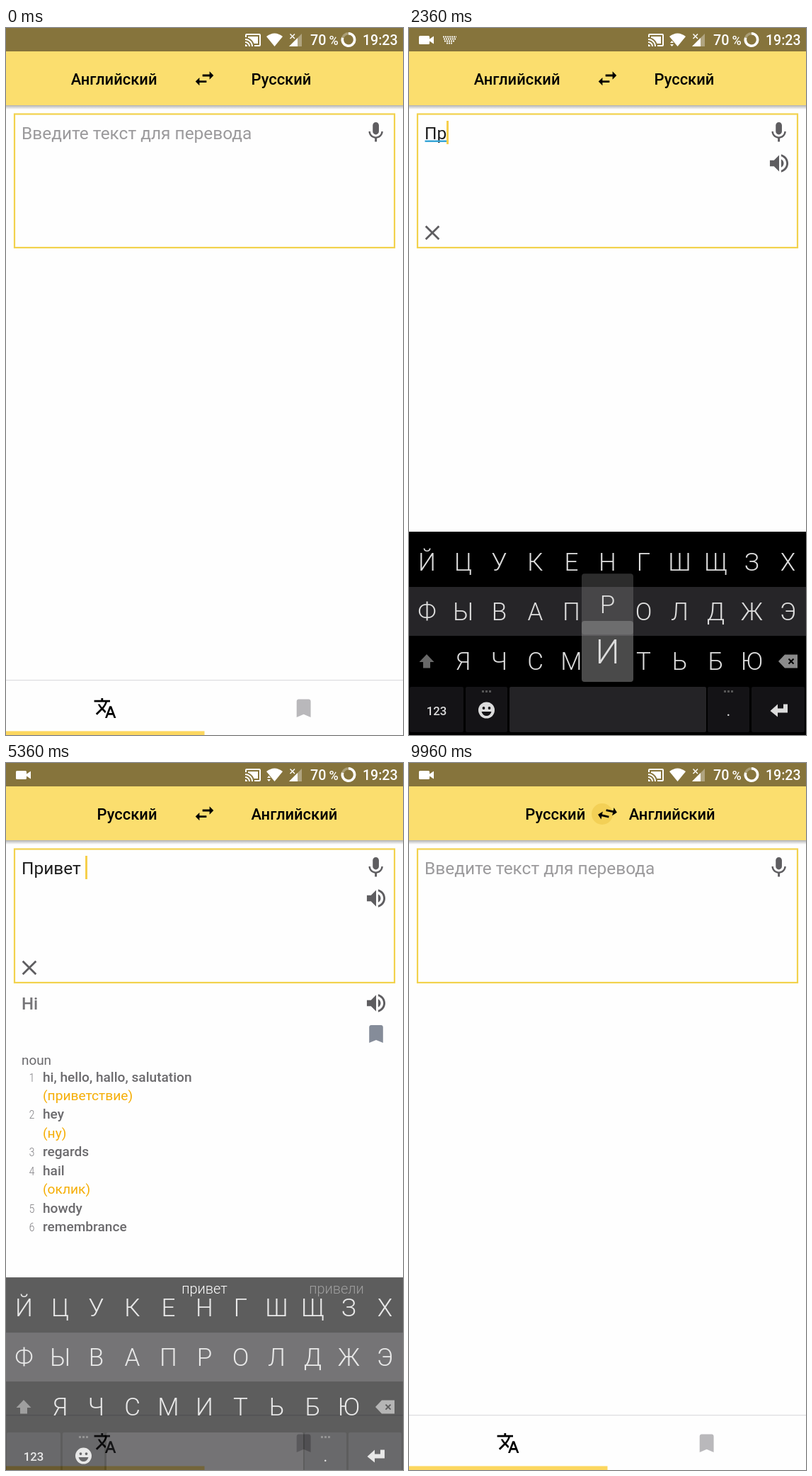
These frames come from a looping animation (561x998 px, 10000 ms). An HTML page:

```html
<!DOCTYPE html>
<html lang="ru">
<head>
<meta charset="utf-8">
<title>Переводчик</title>
<style>
html, body { margin: 0; width: 100%; height: 100%; overflow: hidden; background: #fefefe; }
svg { display: block; font-family: Roboto, "Noto Sans", sans-serif; }
.mid { text-anchor: middle; }
.lang { font-size: 21.9px; font-weight: 500; }
.field { font-size: 24.45px; }
.dict { font-size: 19.1px; font-weight: 500; fill: #6b6a6d; }
.note { font-size: 19.2px; fill: #f5ae06; }
.num { font: 300 16.5px "Roboto Condensed", Roboto, sans-serif; fill: #858488; }
.key { font-weight: 300; fill: #dcdcdc; text-anchor: middle; }
</style>
</head>
<body>
<svg id="stage" width="561" height="998" viewBox="0 0 561 998">
  <defs>
    <linearGradient id="shade" x2="0" y2="1">
      <stop stop-color="#000" stop-opacity=".3"/><stop offset="1" stop-color="#000" stop-opacity="0"/>
    </linearGradient>
    <path id="mic" d="M12 14c1.66 0 2.99-1.34 2.99-3L15 5c0-1.66-1.34-3-3-3S9 3.34 9 5v6c0 1.66 1.34 3 3 3zm5.3-3c0 3-2.54 5.1-5.3 5.1S6.7 14 6.7 11H5c0 3.41 2.72 6.23 6 6.72V21h2v-3.28c3.28-.48 6-3.3 6-6.72h-1.7z"/>
    <path id="sound" d="M3 9v6h4l5 5V4L7 9H3zm13.5 3c0-1.77-1.02-3.29-2.5-4.03v8.05c1.48-.73 2.5-2.25 2.5-4.02zM14 3.23v2.06c2.89.86 5 3.54 5 6.71s-2.11 5.85-5 6.71v2.06c4.01-.91 7-4.49 7-8.77s-2.99-7.86-7-8.77z"/>
    <path id="mark" d="M17 3H7c-1.1 0-1.99.9-1.99 2L5 21l7-3 7 3V5c0-1.1-.9-2-2-2z"/>
  </defs>

  <rect width="561" height="998" fill="#fefefe"/>
  <rect y="109" width="561" height="6" fill="url(#shade)"/>
  <rect y="33" width="561" height="76" fill="#fbde6e"/>
  <rect width="561" height="33" fill="#86743c"/>

  <g fill="#fff">
    <path id="camera" d="M15.5 11H27.5Q29 11 29 12.5V15.5L35 11.5V22.5L29 18.500V21.5Q29 23 27.5 23H15.5Q14 23 14 21.5V12.5Q14 11 15.5 11Z"/>
    <path id="kbIcon" d="M48 12.500H67M49 15.500H66M50 18.500H65M53 21.500H62" fill="none" stroke="#fff" stroke-width="2" stroke-dasharray="2 1"/>
    <path transform="translate(337 5)" d="M21 3H3c-1.1 0-2 .9-2 2v3h2V5h18v14h-7v2h7c1.1 0 2-.9 2-2V5c0-1.1-.9-2-2-2zM1 18v3h3c0-1.66-1.34-3-3-3zm0-4v2c2.76 0 5 2.24 5 5h2c0-3.87-3.13-7-7-7zm0-4v2c4.97 0 9 4.03 9 9h2c0-6.08-4.93-11-11-11zM19 7H5v1.63c3.96 1.28 7.09 4.41 8.37 8.37H19V7z"/>
    <path d="M368 12Q379.5 3 391 12L379.5 26Z"/>
    <path id="traffic" d="M369 21L371.5 18L374 21ZM369 23L371.5 26L374 23Z"/>
    <path d="M400 26L418 8V26Z" opacity=".35"/>
    <path d="M400 26L412 14V26Z"/>
    <path d="M401.5 8.5L408 15M408 8.5L401.5 15" stroke="#fff" stroke-width="1.5"/>
    <text x="430" y="24" font-size="19.7" font-weight="500">70</text>
    <text x="456.500" y="24" font-size="18" font-weight="500">%</text>
    <text x="504" y="24" font-size="19.5" font-weight="500">19:23</text>
    <g fill="none" stroke="#fff" stroke-width="3.5">
      <circle cx="484" cy="16.5" r="8.7" opacity=".3"/>
      <path d="M484 7.8A8.7 8.7 0 1 1 475.7 13.8"/>
    </g>
  </g>

  <circle id="ripple" cx="273" cy="72" fill="#f1ce52" opacity=".85"/>
  <text id="from" class="lang" y="79.5" text-anchor="end"></text>
  <text id="to" class="lang" y="79.5"></text>
  <path id="arrows" d="M6.99 11L3 15l3.99 4v-3H14v-2H6.99v-3zM21 9l-3.99-4v3H10v2h7.01v3L21 9z"/>

  <rect x="12" y="121.500" width="537" height="188.5" fill="none" stroke="#f2d24d" stroke-width="2.2"/>
  <text id="hint" class="field" x="22" y="157" fill="#9b9a9c">Введите текст для перевода</text>
  <text id="typed" class="field" x="22" y="157" fill="#1c1c1c"></text>
  <rect id="under" x="22.5" y="158.5" height="2.5" fill="#38a5d6"/>
  <rect id="caret" y="131" width="3" height="33" fill="#f6cf4c"/>
  <g fill="#5e5d60">
    <use href="#mic" transform="translate(505.2 130.1) scale(1.45)"/>
    <g id="tools">
      <use href="#sound" transform="translate(505.6 173.6) scale(1.45)"/>
      <path d="M23.7 279.7L42.3 298.3M42.3 279.7L23.7 298.3" stroke="#5e5d60" stroke-width="2.8"/>
    </g>
    <g id="answer">
      <text x="22" y="348" font-size="24" font-weight="500" fill="#757477">Hi</text>
      <use href="#sound" transform="translate(505.6 321.6) scale(1.45)"/>
      <use href="#mark" transform="translate(506.2 365.7) scale(1.4)" fill="#858c99"/>
    </g>
  </g>
  <g id="dict"></g>

  <rect y="920" width="561" height="1.3" fill="#dedde0"/>
  <rect y="992.5" width="280.5" height="5.5" fill="#fcd75f"/>
  <path transform="translate(123.2 943.2) scale(1.4)" d="M12.87 15.07l-2.54-2.51.03-.03c1.74-1.94 2.98-4.17 3.71-6.53H17V4h-7V2H8v2H1v1.99h11.17C11.5 7.92 10.44 9.75 9 11.35 8.07 10.32 7.3 9.19 6.69 8h-2c.73 1.63 1.73 3.17 2.98 4.56l-5.09 5.02L4 19l5-5 3.11 3.11.76-2.04zM18.5 10h-2L12 22h2l1.12-3h4.75L21 22h2l-4.5-12zm-2.62 7l1.62-4.33L19.12 17h-3.24z"/>
  <use href="#mark" transform="translate(403.6 943.3) scale(1.42)" fill="#b9b8bb"/>

  <g id="keyboard">
    <rect y="711" width="561" height="327"/>
    <rect y="789" width="561" height="69" fill="#262528"/>
    <g id="bottomKeys" fill="#141316"></g>
    <rect id="space" x="142" y="930" width="278" height="64" rx="2" fill="#242326"/>
    <g id="spaceName" fill="none" stroke="#bbb">
      <text class="mid" x="280.5" y="969.5" font-size="18.5" font-weight="300" fill="#bbb" stroke="none">Русский</text>
      <path d="M237 959V968L228 963.5ZM324 959V968L333 963.5Z"/>
    </g>
    <g id="letters" font-size="35"></g>
    <path id="shift" d="M25 884L35.5 895H30V903.5H20V895H14.5Z"/>
    <path d="M522 894L531 884.5H549V903.5H531Z" fill="#8b8b8b"/>
    <path d="M536.5 890.5L543.5 897.5M543.5 890.5L536.5 897.5" stroke="#000" stroke-width="2"/>
    <g fill="#dcdcdc">
      <text class="mid" x="39" y="969.5" font-size="16.8" font-weight="500">123</text>
      <circle cx="109.5" cy="963" r="11.5"/>
      <text class="mid" x="451.5" y="971" font-size="22">.</text>
      <path d="M510.5 964L521 954.5V960.5H529V954.5H535V966.5H521V972.5Z"/>
    </g>
    <path d="M103 936.5H116M445 936.5H458" stroke="#555" stroke-width="3" stroke-dasharray="3 2"/>
    <g fill="#141316">
      <circle cx="105.5" cy="960" r="1.9"/><circle cx="113.5" cy="960" r="1.9"/>
      <path d="M102.5 965H116.5Q114.5 971 109.5 971Q104.5 971 102.5 965Z"/>
    </g>
    <g id="suggest" font-size="20" font-weight="300" fill="#fff">
      <text class="mid" x="280.5" y="733.5">привет</text>
      <text class="mid" x="467" y="733.5" opacity=".4">привели</text>
    </g>
    <g id="popups"></g>
  </g>
</svg>
<script>
const $ = id => document.getElementById(id);
const set = (el, attrs) => { for (const k in attrs) el.setAttribute(k, attrs[k]); };
const show = (id, on) => $(id).setAttribute('opacity', +on);
const clamp = x => Math.max(0, Math.min(1, x));
const within = (t, spans) => spans.some(([a, b]) => t >= a && t < b);
const create = tag => document.createElementNS('http://www.w3.org/2000/svg', tag);

const entries = [
  ['hi, hello, hallo, salutation', '(приветствие)'], ['hey', '(ну)'], ['regards'],
  ['hail', '(оклик)'], ['howdy'], ['remembrance']
];
let y = 449.5, html = '<text x="22" y="425.5" font-size="18.9" fill="#6b6a6d">noun</text>';
entries.forEach(([word, note], i) => {
  html += `<text class="num" x="32.5" y="${y}">${i + 1}</text><text class="dict" x="52" y="${y}">${word}</text>`;
  y += 26.45;
  if (note) {
    html += `<text class="note" x="52" y="${y}">${note}</text>`;
    y += 26.45;
  }
});
$('dict').innerHTML = html;

$('bottomKeys').innerHTML = [[1, 76], [80, 59], [422, 59], [484, 75]]
  .map(([x, w]) => `<rect x="${x}" y="930" width="${w}" height="64" rx="2"/>`).join('');

const keys = {};
[['ЙЦУКЕНГШЩЗХ', 25.5, 753.5], ['ФЫВАПРОЛДЖЭ', 25.5, 823.5], ['ЯЧСМИТЬБЮ', 76.5, 893]].forEach(([row, x, cy]) =>
  [...row].forEach((ch, i) => {
    const el = create('text');
    keys[ch] = { cx: x + i * 51, cy, el };
    set(el, { class: 'key', x: keys[ch].cx, y: cy + 12.5 });
    el.textContent = ch;
    $('letters').append(el);
  }));

// letter, press time, release time
const presses = [
  ['П', 1900, 1980], ['р', 2200, 2280], ['и', 2340, 2420],
  ['в', 2560, 2640], ['е', 2800, 2890], ['т', 2930, 3010]
];
const pops = presses.map(([ch, down, up]) => {
  const key = keys[ch.toUpperCase()];
  const g = create('g');
  g.innerHTML = `<rect x="${key.cx - 36.5}" width="73" height="86" rx="4" fill="#949494"/>` +
    `<text class="key" x="${key.cx}">${ch.toUpperCase()}</text>`;
  $('popups').append(g);
  return { key, down, up, g };
});

const blinks = [
  [80, 400], [1320, 1600], [1840, 4000], [4240, 4520], [5000, 5520],
  [6000, 6280], [6800, 7280], [7800, 8280], [8800, 9160]
];
const CLEAR = 8800, SPACE = 3120, SWAPS = [3840, 9882], SWAP_MS = 500;

function drawKeyboard(t) {
  const enter = clamp((t - 960) / 220), leave = clamp((t - 5280) / 220);
  set($('keyboard'), {
    opacity: enter * (1 - leave),
    transform: `translate(0 ${(1 - enter) * 74 + leave * 41})`
  });
  show('kbIcon', t >= 1000 && t < 5280);
  show('space', !within(t, [[3020, SPACE]]));
  show('spaceName', clamp((1800 - t) / 300));
  show('suggest', t >= 3240);
  $('shift').setAttribute('fill', t < 1980 ? '#fff' : '#686868');
  for (const { key, down, up, g } of pops) {
    const s = t < down ? 0 : clamp(1 - (t - up) / 200);
    const size = t < up ? 48 : 35;
    const [box, label] = g.children;
    set(g, { display: s ? 'inline' : 'none' });
    key.el.setAttribute('opacity', s ? 0 : 1);
    set(box, { y: key.cy - 56 + 7 * (1 - s), opacity: s / 2 });
    set(label, { y: key.cy - 5 - 8 * s + size * .355, 'font-size': size });
  }
}

function drawField(t) {
  const count = t < CLEAR ? presses.filter(p => t >= p[2]).length : 0;
  const typed = presses.slice(0, count).map(p => p[0]).join('');
  $('typed').textContent = typed;
  const width = count ? $('typed').getComputedTextLength() : 0;
  const spaced = count && t >= SPACE;
  show('hint', !count);
  show('tools', count > 0);
  set($('under'), { width, opacity: spaced ? 0 : 1 });
  $('caret').setAttribute('x', Math.round(22 + width + (spaced ? 6 : 0)));
  show('caret', within(t, blinks));
  show('answer', t >= 3560 && t < CLEAR);
  show('dict', t >= 3840 && t < CLEAR);
}

function drawHeader(t) {
  const start = t < SWAPS[1] ? SWAPS[0] : SWAPS[1];
  const p = clamp((t - start) / SWAP_MS);
  const shift = 75 * Math.sin(Math.PI * p);
  const toEnglish = t >= SWAPS[0] + SWAP_MS / 2;
  const opacity = clamp((75 - shift) / 30);
  const names = ['Английский', 'Русский'];
  $('from').textContent = names[+toEnglish];
  $('to').textContent = names[+!toEnglish];
  set($('from'), { x: 213.5 + shift, opacity });
  set($('to'), { x: 346.5 - shift, opacity });
  const angle = 180 * p * p * (3 - 2 * p);
  set($('arrows'), { transform: `translate(280.5 71.3) rotate(${angle}) scale(1.42) translate(-12 -12)` });
  $('ripple').setAttribute('r', 15 * clamp((t - SWAPS[1]) / 60));
}

function frame(now) {
  const t = now % 10000;
  show('camera', t >= 40);
  show('traffic', t >= 800 && t < 5800);
  drawHeader(t);
  drawField(t);
  drawKeyboard(t);
  requestAnimationFrame(frame);
}
frame(0);
</script>
</body>
</html>
```
